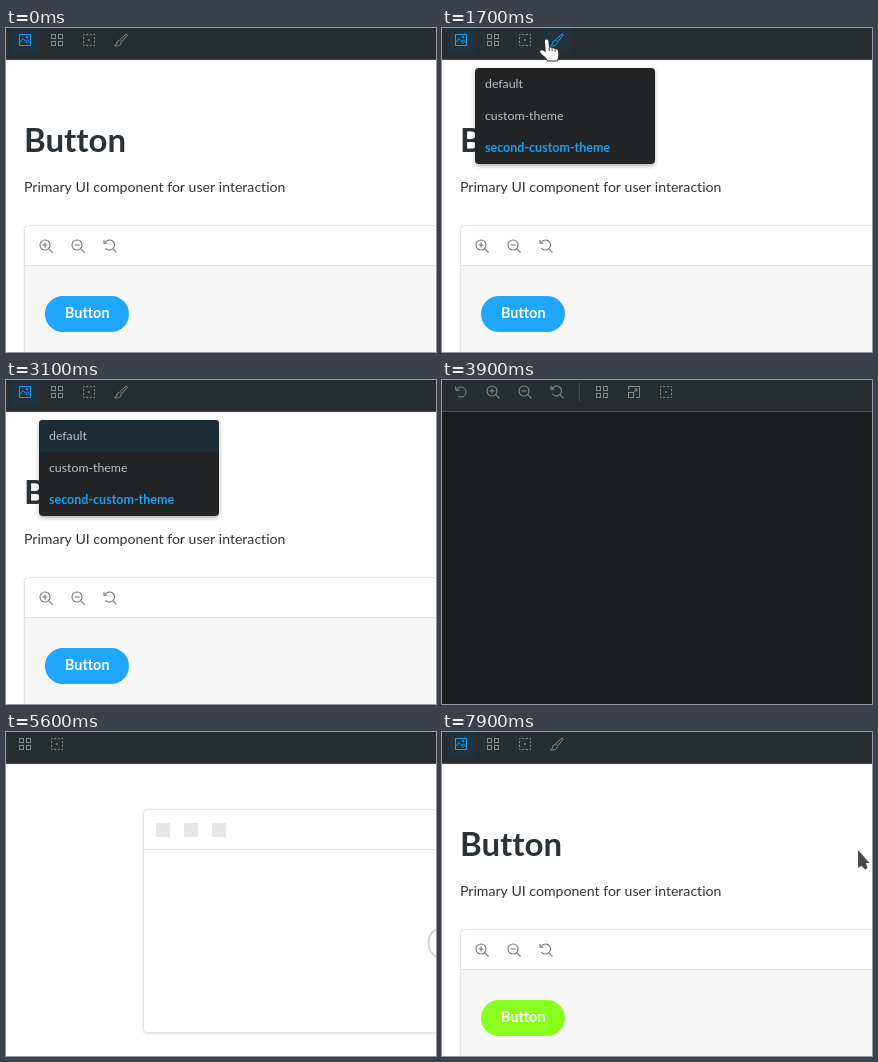
Recreate the animation shown at these times as an HTML page with a canvas. Size 430x324 px, loop 8000 ms.

```html
<!DOCTYPE html>
<html lang="en">
<head>
<meta charset="utf-8">
<title>Theme switcher</title>
<style>
  html, body { margin: 0; width: 100%; height: 100%; overflow: hidden; background: #fff; }
  canvas { display: block; }
</style>
</head>
<body>
<canvas id="stage" width="430" height="324"></canvas>
<script>
const ctx = document.getElementById('stage').getContext('2d');
const W = 430, H = 324, LOOP = 8000, STEP = 100;
const BLUE = '#1b9cf0', GRAY = '#82898c', ZOOM_GRAY = '#737b80';

ctx.textRendering = 'optimizeSpeed'; // no ligatures

function rect(x, y, w, h, color) {
  ctx.fillStyle = color;
  ctx.fillRect(x, y, w, h);
}

function roundRect(x, y, w, h, r) {
  ctx.beginPath();
  ctx.roundRect(x, y, w, h, r);
}

function text(str, x, y, size, color, weight = 400) {
  ctx.font = `${weight} ${size}px Lato, "Open Sans", sans-serif`;
  ctx.fillStyle = color;
  ctx.fillText(str, x, y);
}

function shadow(color, blur, dy) {
  ctx.shadowColor = color;
  ctx.shadowBlur = blur;
  ctx.shadowOffsetY = dy;
}

// Runs draw with the origin at (x, y) and the given stroke and fill color.
function at(x, y, color, draw) {
  ctx.save();
  ctx.translate(x, y);
  ctx.strokeStyle = ctx.fillStyle = color;
  ctx.lineWidth = 1;
  draw();
  ctx.restore();
}

function line(...points) {
  ctx.beginPath();
  points.forEach(([x, y]) => ctx.lineTo(x, y));
  ctx.stroke();
}

function arc(x, y, r, from = 0, to = Math.PI * 2) {
  ctx.beginPath();
  ctx.arc(x, y, r, from, to);
  ctx.stroke();
}

function magnifier(sign) {
  ctx.lineWidth = 1.1;
  arc(-1, -1, 5);
  line([2.6, 2.6], [6.5, 6.5]);
  line([-3.5, -1], [1.5, -1]);
  if (sign === '+') line([-1, -3.5], [-1, 1.5]);
}

const icons = {
  image() {
    ctx.strokeRect(-5.5, -5.5, 11, 11);
    line([-5.5, 2.5], [-2, -1.5], [2.5, 3.5]);
    line([0.5, 1.5], [2.5, -0.2], [5.5, 3]);
    arc(2, -2.8, 0.9);
  },
  grid() {
    for (const x of [-5.5, 1.5]) for (const y of [-5.5, 1.5]) ctx.strokeRect(x, y, 4, 4);
  },
  outline() {
    // Three dash periods per side, centred on the corners.
    ctx.setLineDash([2, 5 / 3]);
    ctx.lineDashOffset = 1;
    ctx.strokeRect(-5.5, -5.5, 11, 11);
    ctx.fillRect(-0.8, -0.8, 1.6, 1.6);
  },
  brush() {
    line([-1.5, 0], [5, -6], [6.3, -4.8], [0.5, 2], [-1.5, 0]);
    ctx.beginPath();
    ctx.moveTo(-2, 0.5);
    ctx.quadraticCurveTo(-5, 1, -4.5, 4);
    ctx.lineTo(-6.5, 6);
    ctx.quadraticCurveTo(0, 6.5, 0.2, 2.5);
    ctx.stroke();
  },
  grow() {
    ctx.strokeRect(-5.5, 0.5, 5, 5);
    line([-5.5, -2], [-5.5, -5.5], [5.5, -5.5], [5.5, 5.5], [2, 5.5]);
    line([0, 0], [3, -3]);
    line([0.5, -3], [3, -3], [3, -0.5]);
  },
  zoomIn() { magnifier('+'); },
  zoomOut() { magnifier('-'); },
  reset() {
    ctx.lineWidth = 1.1;
    arc(-0.5, -1, 5, -2.8, 2.5);
    line([-6, -6], [-6, -2.7], [-2.7, -2.7]);
    line([3, 2.6], [6.5, 6.5]);
  },
  sync() {
    arc(0, 0, 5, -2.8, 2.3);
    line([-5.5, -5.5], [-5, -1.5], [-1, -2]);
  }
};

const icon = (name, x, y = 12, color = GRAY) => at(x, y, color, icons[name]);

function toolbar(t, brushHover) {
  rect(0, 0, W, 32, '#282d30');
  rect(0, 31, W, 1, '#454a4d');
  if (t >= 3900 && t < 4300) {
    ['sync', 'zoomIn', 'zoomOut', 'reset'].forEach((name, i) => icon(name, 19 + i * 32));
    rect(137, 2, 1, 20, '#454b4e');
    ['grid', 'grow', 'outline'].forEach((name, i) => icon(name, 160 + i * 32));
  } else if (t >= 4300 && t < 6100) {
    icon('grid', 19);
    icon('outline', 51);
  } else {
    const active = '#22333d';
    rect(5, 0, 28, 26, active);
    if (brushHover) rect(101, 0, 28, 26, active);
    icon('image', 19, 12, BLUE);
    icon('grid', 51);
    icon('outline', 83);
    icon('brush', 115, 12, brushHover ? BLUE : GRAY);
  }
}

function card(x, y, h, divider, border) {
  ctx.save();
  shadow('rgba(0,0,0,.1)', 3, 1);
  roundRect(x, y, 600, h, 4);
  ctx.fillStyle = '#fff';
  ctx.fill();
  ctx.restore();
  roundRect(x + 0.5, y + 0.5, 600, h - 1, 4);
  ctx.strokeStyle = border;
  ctx.lineWidth = 1;
  ctx.stroke();
  rect(x + 1, divider, 600, 1, border);
}

function spinner(x, y, turn) {
  at(x, y, '#d4d4d4', () => {
    ctx.lineWidth = 2;
    ctx.rotate(turn * Math.PI * 2);
    arc(0, 0, 16.5);
    ctx.strokeStyle = '#646464';
    arc(0, 0, 16.5, -Math.PI * 0.75, -Math.PI * 0.25);
  });
}

function skeleton(t) {
  card(137, 77, 224, 117, '#e3e3e3');
  for (const x of [150, 178, 206]) rect(x, 91, 14, 14, '#e6e6e6');
  spinner(439, 211, (t - 5500) / 700);
}

function docs(t) {
  const loading = t >= 6800 && t < 7600;
  text('Button', 18, 124, 33, '#2a3238', 700);
  text('Primary UI component for user interaction', 18, 164, 14.1, '#30363a');
  card(18, 197, loading ? 102 : 200, 237, '#dfe6e6');
  ['zoomIn', 'zoomOut', 'reset'].forEach((name, i) => icon(name, 40 + i * 32, 218, ZOOM_GRAY));
  if (loading) {
    spinner(432.5, 270, (t - 6765) / 700);
    return;
  }
  rect(19, 238, W, H, '#f7f7f7');
  roundRect(39, 268, 84, 36, 18);
  ctx.fillStyle = t < 3900 ? '#1ea7fd' : '#8aff1e';
  ctx.fill();
  text('Button', 59, 290, 14.4, '#fff', 700);
}

function menu(hovered) {
  ctx.save();
  shadow('rgba(0,0,0,.3)', 4, 2);
  roundRect(33, 40, 180, 96, 4);
  ctx.fillStyle = '#222425';
  ctx.fill();
  ctx.restore();
  if (hovered) {
    roundRect(33, 40, 180, 32, [4, 4, 0, 0]);
    ctx.fillStyle = '#202c33';
    ctx.fill();
  }
  text('default', 43, 60, 12.3, '#bcbfc1');
  text('custom-theme', 43, 92, 12.3, '#bcbfc1');
  text('second-custom-theme', 43, 124, 12.5, BLUE, 700);
}

const arrowPath = new Path2D('M1 0V18L4.5 15.8 8 19.5 10.5 18 9 13H12.5Z');
const handPath = new Path2D('M6 2.2Q6 .6 7.6 .6T9.4 2.2L10 9Q12 7.8 13 9.6 15 8.6 16 10.4 18.6 9.6 19 12.2L19.3 16Q19.3 18.5 18 21.5H9Q7 18 3 15.5 .2 12.6 1.6 11.4 3 10.4 6.8 13.2Z');

function pointer(x, y, hand) {
  at(x, y, hand ? '#333' : '#fff', () => {
    const shape = hand ? handPath : arrowPath;
    ctx.lineJoin = 'round';
    ctx.lineWidth = 2;
    ctx.fillStyle = hand ? '#fff' : '#4a4a4a';
    ctx.stroke(shape);
    ctx.fill(shape);
    if (hand) {
      ctx.lineWidth = 1;
      line([10, 9], [10.3, 12]);
      line([13, 9.6], [13.2, 12.2]);
      line([16, 10.4], [16.1, 12.8]);
    }
  });
}

const mix = (a, b, p) => a + (b - a) * p;

// Top-left corner and shape of the mouse pointer, or null while it is off stage.
function pointerAt(t) {
  if (t >= 500 && t < 2000) {
    const p = Math.min(1, (t - 500) / 800);
    const q = 1 - (1 - p) ** 2;
    return { x: mix(266, 97, q), y: mix(49, 11, q), hand: q > 0.9 };
  }
  if (t >= 2000 && t < 2800) {
    const p = Math.min(1, (t - 1900) / 600);
    const x = (1 - p) ** 2 * 97 + 2 * p * (1 - p) * 4 + p * p * 78;
    const y = mix(11, 58, 1 - (1 - p) ** 2);
    return { x, y, hand: y < 16 || y > 38 };
  }
  if (t >= 2800 && t < 3100) {
    const p = (t - 2700) / 300;
    const x = mix(78, 361, p);
    return { x, y: mix(58, 65, p), hand: x < 205 };
  }
  return t >= 7900 ? { x: 415, y: 118, hand: false } : null;
}

function draw(t) {
  const mouse = pointerAt(t);
  const blank = t >= 6100 && t < 6800;
  rect(0, 0, W, H, t >= 3900 && t < 5600 ? '#1b1d1e' : '#fff');
  if (t < 3900 || t >= 6800) docs(t);
  else if (t >= 5600 && !blank) skeleton(t);
  toolbar(t, t < 2100 && mouse !== null && mouse.hand);
  if (t >= 1700 && t < 3900) menu(t >= 2200);
  if (mouse) pointer(Math.round(mouse.x), Math.round(mouse.y), mouse.hand);
}

const start = performance.now();
function frame() {
  const t = (performance.now() - start) % LOOP;
  draw(Math.floor(t / STEP) * STEP);
  requestAnimationFrame(frame);
}
frame();
</script>
</body>
</html>
```
